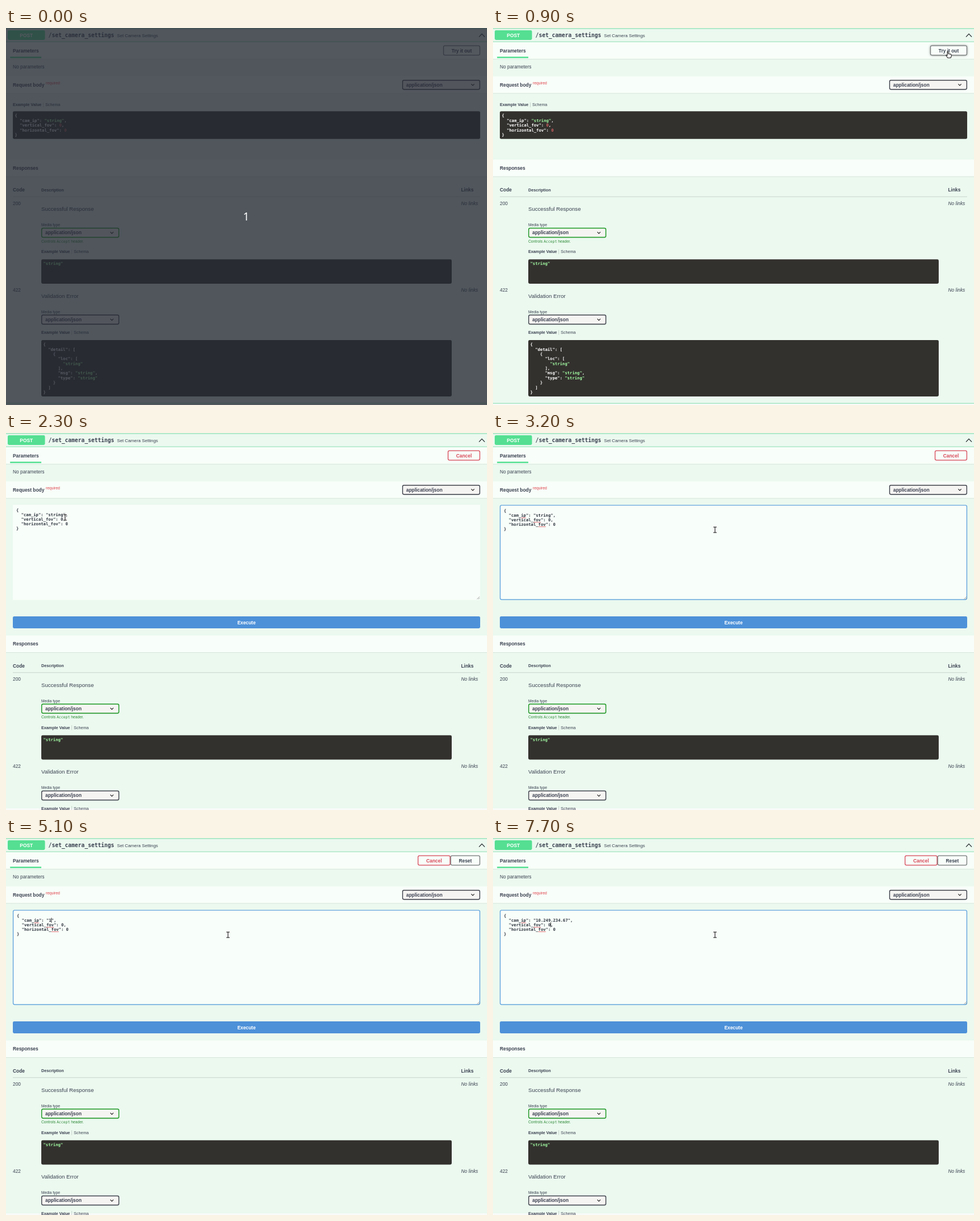
Write an HTML page with a canvas that moves like this. It is 845x662 px and loops after 8000 ms.

```html
<!DOCTYPE html>
<html lang="en">
<head>
<meta charset="utf-8">
<title>API request form</title>
<style>
html, body { margin: 0; width: 100%; height: 100%; overflow: hidden; background: #fafafa; }
canvas { display: block; }
</style>
</head>
<body>
<canvas id="stage" width="845" height="662"></canvas>
<script>
const ctx = document.getElementById('stage').getContext('2d');
const LOOP = 8000;
const SANS = '"Liberation Sans", Arial, sans-serif';
const MONO = '"DejaVu Sans Mono", monospace';
const INK = '#3b4151', PAGE = '#ebf9ef', BAND = '#f8fef9', GREEN = '#55df92';
const CODE = '#33312e', RED = '#d9485a', LIME = '#a2fca2';
const CHAR = 7.2 * 0.602;

// y is the middle of the capital letters
function text(str, x, y, { size = 8.4, weight = '', color = INK, font = SANS, align = 'left' } = {}) {
  ctx.font = `${weight} ${size}px ${font}`;
  ctx.fillStyle = color;
  ctx.textAlign = align;
  ctx.fillText(str, x, y + size * 0.36);
  return ctx.measureText(str).width;
}
const bold = (str, x, y, opts) => text(str, x, y, { weight: 'bold', ...opts });
const mono = (str, x, y, color) => bold(str, x, y, { size: 7.2, font: MONO, color });

function rect(x, y, w, h, color) {
  ctx.fillStyle = color;
  ctx.fillRect(x, y, w, h);
}

function box(x, y, w, h, { fill, stroke, line = 1.3, shadow, blur = 3, dy = 0 } = {}) {
  ctx.save();
  ctx.beginPath();
  ctx.roundRect(x, y, w, h, 2.4);
  if (shadow) {
    ctx.shadowColor = shadow;
    ctx.shadowBlur = blur;
    ctx.shadowOffsetY = dy;
  }
  if (fill) { ctx.fillStyle = fill; ctx.fill(); }
  ctx.shadowColor = 'transparent';
  if (stroke) { ctx.strokeStyle = stroke; ctx.lineWidth = line; ctx.stroke(); }
  ctx.restore();
}

function polyline(points, color, width) {
  ctx.beginPath();
  points.forEach(([x, y]) => ctx.lineTo(x, y));
  ctx.strokeStyle = color;
  ctx.lineWidth = width;
  ctx.stroke();
}

function band(y, title) {
  rect(0, y, 845, 30, BAND);
  rect(0, y + 29.5, 845, 1, '#d6e5dc');
  bold(title, 12, y + 14.7);
}

function select(x, y, stroke) {
  box(x + 0.7, y + 0.7, 135.6, 16, { fill: '#f6f4f2', stroke, line: 1.4, shadow: 'rgba(0,0,0,.25)', blur: 2, dy: 0.6 });
  bold('application/json', x + 7, y + 8.5);
  polyline([[x + 121.3, y + 7.3], [x + 124, y + 10], [x + 126.7, y + 7.3]], '#222', 1.2);
}

function tabs(x, y) {
  bold('Example Value', x, y, { size: 7.2 });
  rect(x + 53, y - 4, 0.7, 8.5, '#b9c4c0');
  text('Schema', x + 57, y, { size: 7.2 });
}

// Colours quoted values and numbers after a key, or a lone quoted value
function codeBlock(x, y, w, h, lines) {
  box(x, y, w, h, { fill: CODE });
  lines.forEach((line, i) => {
    const ly = y + 7.6 + i * 8.37;
    const [, head, value, tail] = line.match(/^(\s*(?:"\w+": )?)("\w+"|\d+|)(.*)$/);
    const at = n => x + 3.5 + n * CHAR;
    mono(head, at(0), ly, '#fff');
    mono(value, at(head.length), ly, value[0] === '"' ? LIME : '#d36363');
    mono(tail, at(head.length + value.length), ly, '#fff');
  });
}

function button(label, x, w, color, shadow = 0, border = color) {
  box(x + 0.6, 31.1, w - 1.2, 16.6, {
    fill: BAND, stroke: border, line: 1.3,
    shadow: `rgba(0,0,0,${0.1 + shadow * 0.45})`, blur: 2 + shadow * 2
  });
  bold(label, x + w / 2, 39.5, { color, align: 'center' });
}

function header() {
  rect(0, 0, 845, 662, '#f8fbf9');
  rect(0, 1, 845, 658, PAGE);
  rect(0, 0.4, 845, 1.3, '#8fdfb5');
  rect(0, 23.6, 845, 1.2, '#8fdfb5');
  box(3, 4, 65.5, 17, { fill: GREEN });
  bold('POST', 35.7, 12.7, { color: '#fff', align: 'center' });
  bold('/set_camera_settings', 74.6, 12.8, { size: 9.6, font: MONO });
  text('Set Camera Settings', 195, 13, { size: 7.8 });
  polyline([[831, 15.6], [836, 10.4], [841, 15.6]], '#25292d', 1.3);
  band(24.8, 'Parameters');
  rect(7.2, 50.4, 54.8, 2.5, GREEN);
  text('No parameters', 12, 68);
  band(84.8, 'Request body');
  text('required', 70, 96.8, { size: 6.72, color: '#e0404c' });
  select(696, 91, '#41444e');
}

function response(code, title, y, borderColor) {
  text(code, 12, y);
  text('No links', 799.5, y, { weight: 'italic' });
  text(title, 62, y + 9.8, { size: 9.6 });
  text('Media type', 62, y + 38, { size: 6.72 });
  select(62, y + 43, borderColor);
}

function responses(dy) {
  ctx.save();
  ctx.translate(0, dy);
  band(231, 'Responses');
  bold('Code', 12, 284.3);
  bold('Description', 62, 284.3, { size: 7.2 });
  bold('Links', 799.5, 284.3);
  rect(12, 295.8, 821, 0.9, '#c3d0cb');

  response('200', 'Successful Response', 307.8, '#1b9a22');
  const green = { size: 6.72, color: '#2f8a38' };
  let x = 62;
  x += text('Controls ', x, 374.5, green);
  x += text('Accept', x, 374.5, { ...green, size: 6.5, font: MONO });
  text(' header.', x, 374.5, green);
  tabs(62, 392.7);
  codeBlock(62, 406.3, 721, 42.7, ['"string"']);

  response('422', 'Validation Error', 460.3, '#41444e');
  tabs(62, 534.5);
  codeBlock(62, 548, 721, 99, [
    '{', '  "detail": [', '    {', '      "loc": [', '        "string"', '      ],',
    '      "msg": "string",', '      "type": "string"', '    }', '  ]', '}'
  ]);
  rect(0, 658.5, 845, 1.2, '#8fdfb5');
  ctx.restore();
}

// Edit times: removals of "string", then the typed address
const ERASE = [3500, 3600, 3700, 3900, 4100, 4200];
const ADDRESS = '10.249.234.67';
const TYPE = [5100, 5200, 5400, 5600, 5800, 5900, 6100, 6300, 6400, 6600, 6700, 7000, 7100];
const done = (times, t) => times.filter(at => at <= t).length;

function editor(t) {
  const focus = t >= 2600;
  const x = focus ? 19 : 18, y = focus ? 136.7 : 135.6;
  const value = t < TYPE[0] ? 'string'.slice(0, 6 - done(ERASE, t)) : ADDRESS.slice(0, done(TYPE, t));
  rect(12, 126, 821, 167.3, BAND);
  if (focus) box(12.6, 126.9, 819.8, 165.6, { stroke: '#62a4dc', line: 1.4 });
  [[827.5, 832], [830, 832]].forEach(([a, b]) =>
    polyline([[a, 291.8], [b, 291.8 - (b - a)]], '#777', 0.7));

  const lines = ['{', `  "cam_ip": "${value}",`, '  "vertical_fov": 0,', '  "horizontal_fov": 0', '}'];
  lines.forEach((line, i) => mono(line, x, y + i * 7.83, '#2f3540'));
  if (!focus) return;

  [[1, 7, 2], [2, 12, 3], [3, 14, 3]].forEach(([row, col, len]) =>
    rect(x + col * CHAR, y + row * 7.83 + 4, len * CHAR, 0.9, '#e2606a'));

  const hidden = (t >= 3200 && t < 3500) || (t >= 4400 && t < 5100) || (t >= 7600 && t < 7700);
  if (hidden) return;
  const row = t < 7700 ? 1 : 2;
  const col = row === 1 ? 13 + value.length : 19;
  rect(x + col * CHAR - 0.3, y + row * 7.83 - 4.4, 0.9, 8.6, '#222');
}

function outlined(points) {
  ctx.beginPath();
  points.forEach(([x, y]) => ctx.lineTo(x, y));
  ctx.closePath();
  ctx.lineJoin = 'round';
  ctx.fillStyle = '#fff';
  ctx.strokeStyle = '#222';
  ctx.lineWidth = 1.1;
  ctx.fill();
  ctx.stroke();
}

const pointers = {
  arrow: () => outlined([[0, 0], [0, 10], [2.3, 8], [4, 11.6], [5.6, 10.8], [4, 7.4], [7, 7.2]]),
  hand: () => outlined([[-2.4, -5], [-1, -5], [-0.6, -1.4], [3.6, -0.6], [4.8, 0.6], [4.6, 3.6],
    [3.4, 6], [-1.6, 6], [-4.6, 1.8], [-4, 0.8], [-2.4, 1.8]]),
  beam() {
    for (const [color, width] of [['#fff', 2.6], ['#222', 1.2]]) {
      polyline([[0, -4.6], [0, 4.6]], color, width);
      polyline([[-2.8, -4.8], [2.8, -4.8]], color, width);
      polyline([[-2.8, 4.8], [2.8, 4.8]], color, width);
    }
  }
};

const PATH = [
  [1300, 744, 55.5], [1600, 95, 90], [1700, 95, 90], [1800, 112, 155], [2000, 112, 155],
  [2400, 101, 146], [2500, 101, 146], [2900, 390, 170], [LOOP, 390, 170]
];

function pathAt(t) {
  const i = PATH.findIndex(key => key[0] > t);
  const [t0, x0, y0] = PATH[i - 1], [t1, x1, y1] = PATH[i];
  const p = (t - t0) / (t1 - t0);
  return [x0 + (x1 - x0) * p, y0 + (y1 - y0) * p];
}

function pointer(t) {
  if (t < 500) return;
  const [x, y] = t < 1300 ? [800.5, 46.5] : pathAt(t);
  ctx.save();
  ctx.translate(x, y);
  pointers[t < 1300 ? 'hand' : t < 1600 ? 'arrow' : 'beam']();
  ctx.restore();
}

function example() {
  tabs(12, 134.7);
  codeBlock(12, 146.2, 821, 48.6, [
    '{', '  "cam_ip": "string",', '  "vertical_fov": 0,', '  "horizontal_fov": 0', '}'
  ]);
}

const mix = (a, b, p) => `rgb(${a.map((v, i) => v + (b[i] - v) * p)})`;
const clamp = v => Math.max(0, Math.min(1, v));

function draw(t) {
  header();
  if (t < 1300) {
    button('Try it out', 768, 65, INK, clamp((t - 400) / 500), '#777b7d');
    example();
    responses(0);
  } else {
    const p = clamp((t - 1300) / 300);
    if (t < ERASE[0]) {
      const color = mix([59, 65, 81], [217, 72, 90], p);
      button('Cancel', 776, 57, color, 1 - p, mix([105, 108, 112], [217, 72, 90], p));
    } else {
      button('Cancel', 723.3, 57.4, RED);
      button('Reset', 780.7, 52.3, INK, 0, '#777b7d');
    }
    editor(t);
    box(12, 322, 821, 21, { fill: '#4d91d9' });
    bold('Execute', 422.5, 332.6, { color: '#fff', align: 'center' });
    responses(124.5);
  }
  pointer(t);
  if (t < 100) {
    rect(0, 0, 845, 662, 'rgba(38,42,52,.78)');
    text('1', 422, 331, { size: 19, color: '#fff', font: '"Noto Sans", sans-serif', align: 'center' });
  }
}

function frame(now) {
  draw(Math.floor((now % LOOP) / 100) * 100);
  requestAnimationFrame(frame);
}
requestAnimationFrame(frame);
</script>
</body>
</html>
```
